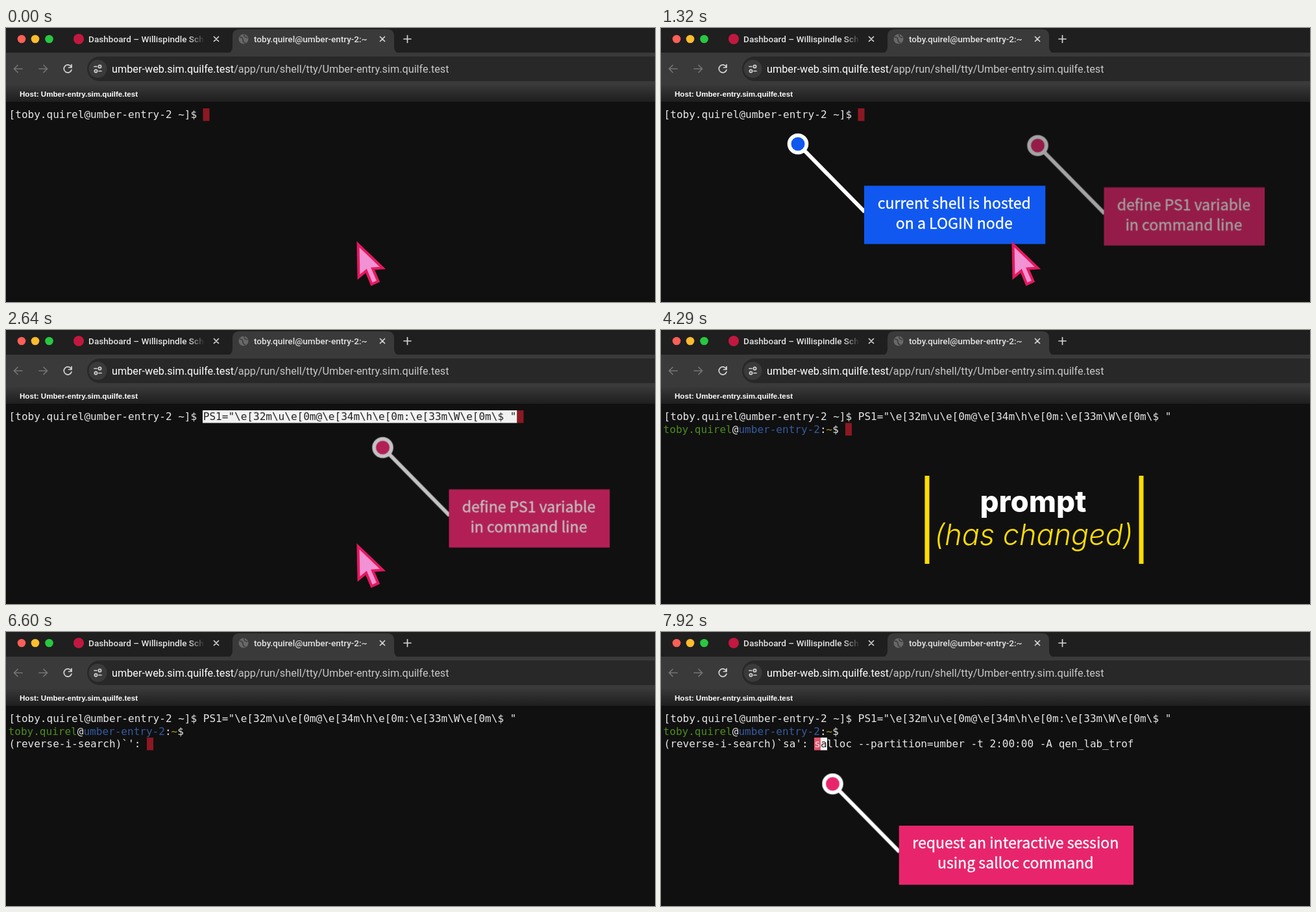
Write an HTML page that moves like this. It is 1000 px wide and 423 px high and loops after 8 s.

```html
<!DOCTYPE html>
<html lang="en">
<head>
<meta charset="utf-8">
<title>Shell session</title>
<style>
  html, body { margin: 0; width: 100%; height: 100%; overflow: hidden; background: #101010; }
  svg { display: block; width: 100vw; height: 100vh; }
  text { white-space: pre; }
  .ui { font: 500 13.6px Roboto, sans-serif; fill: #e4e4e4; }
  .url { font: 400 16.25px Roboto, sans-serif; fill: #c9c9c9; }
  .host { font: 700 11.6px "Liberation Sans", sans-serif; fill: #fff; }
  .term { font: 16.04px "DejaVu Sans Mono", monospace; fill: #e6e6e6; }
  .note { font: 400 23.1px "Noto Sans CJK JP", "Noto Sans CJK SC", "Noto Sans CJK", sans-serif;
          fill: #fff; stroke: #fff; stroke-width: .35; text-anchor: middle; }
  .head { font: 800 45.6px Inter, sans-serif; fill: #fff; text-anchor: middle; }
  .sub { font: italic 300 45px Inter, sans-serif; fill: #ffdc00; text-anchor: middle; }
  .icon { fill: none; stroke: #d6d6d6; stroke-width: 1.7; stroke-linecap: round; }
  .dim { stroke: #747474; }
  .user { fill: #4d8c1f; } .node { fill: #355ba0; } .dir { fill: #b89a10; }
</style>
</head>
<body>
<svg viewBox="0 0 1000 423" preserveAspectRatio="none">
  <defs>
    <linearGradient id="bar" x2="0" y2="1">
      <stop offset="0" stop-color="#383838"/><stop offset="1" stop-color="#1e1e1e"/>
    </linearGradient>
    <linearGradient id="fade">
      <stop offset="0" stop-color="#1f1f1f" stop-opacity="0"/><stop offset="1" stop-color="#1f1f1f"/>
    </linearGradient>
  </defs>
  <rect width="1000" height="423" fill="#101010"/>

  <!-- browser window -->
  <rect width="1000" height="40" fill="#1f1f1f"/>
  <path d="M339 39Q349 39 349 29V13Q349 2 360 2H587Q598 2 598 13V29Q598 39 608 39Z" fill="#3a3a3a"/>
  <rect y="38" width="1000" height="50" fill="#3a3a3a"/>
  <rect x="125" y="44" width="900" height="38" rx="19" fill="#282828"/>
  <rect y="88" width="1000" height="26" fill="url(#bar)"/>
  <circle cx="24" cy="17" r="6.3" fill="#fe5f57"/>
  <circle cx="45" cy="17" r="6.3" fill="#febc2e"/>
  <circle cx="66.500" cy="17" r="6.3" fill="#28c840"/>
  <circle cx="112" cy="17" r="8" fill="#c2183f"/>
  <text class="ui" x="127" y="21.500">Dashboard – Willispindle Sch</text>
  <rect x="282" y="4" width="24" height="30" fill="url(#fade)"/>
  <rect x="306" y="4" width="10" height="30" fill="#1f1f1f"/>
  <circle cx="366" cy="17" r="7.5" fill="#686868"/>
  <path d="M360 14q5 0 5 4t4 5M367 10q-1 4 5 5" fill="none" stroke="#3a3a3a" stroke-width="1.6"/>
  <text class="ui" x="382" y="21.500">toby.quirel@umber-entry-2:~</text>
  <g class="icon">
    <path d="M320.500 13.500l7 7m0-7l-7 7M576.500 13.500l7 7m0-7l-7 7M613 17h11M618.500 11.500v11"/>
    <path class="dim" d="M25 63H13m5-5.500L12.500 63l5.500 5.500M51 63h12m-5-5.500l5.500 5.500-5.500 5.500"/>
    <path d="M100.500 60a6 6 0 1 0 .5 4.500M101 56.500v4.500h-4.500"/>
  </g>
  <circle cx="141.500" cy="63" r="14" fill="#3a3a3a"/>
  <g class="icon">
    <path d="M136 59.500h4M143 66.500h4"/>
    <circle cx="144.500" cy="59.500" r="2.100"/><circle cx="138.500" cy="66.500" r="2.100"/>
  </g>
  <text class="url" x="163" y="68.500"><tspan fill="#fff">umber-web.sim.quilfe.test</tspan>/app/run/shell/tty/Umber-entry.sim.quilfe.test</text>
  <text class="host" x="21" y="106">Host: Umber-entry.sim.quilfe.test</text>

  <!-- terminal -->
  <rect id="mark" x="303" y="124" width="484.500" height="19.500" fill="#f2f2f2"/>
  <rect id="caret" width="10" height="19.500" fill="#8c1822"/>
  <g id="match">
    <rect x="236" y="163" width="10" height="19.500" fill="#e8536b"/>
    <rect x="246" y="163" width="10" height="19.500" fill="#f5f5f5"/>
  </g>
  <text class="term" x="4.600" y="139">[toby.quirel@umber-entry-2 ~]$ <tspan id="command"></tspan></text>
  <text class="term prompt" x="3.600" y="158.500"></text>
  <text class="term prompt" x="3.600" y="178"></text>
  <text class="term" id="search" x="4.600" y="178"></text>

  <g id="notes"></g>

  <g id="title">
    <g id="bars" fill="#ffdc00">
      <rect x="406.500" y="225" width="7" height="136"/>
      <rect x="736.500" y="225" width="7" height="136"/>
    </g>
    <g id="words">
      <text class="head" x="573.500" y="281">prompt</text>
      <text class="sub" x="574.500" y="331.500">(has changed)</text>
    </g>
  </g>

  <path id="pointer" d="M542.500 334L543.500 384.500L555 375L563.500 395.500L573.500 391L565 371.500L580.500 370.500Z"
        fill="#f291d3" stroke="#e5195f" stroke-width="4"/>
</svg>
<script>
const LOOP = 8000, STEP = 330, FADE = 880;
const $ = id => document.getElementById(id);
const ramp = (t, from, to) => Math.min(1, Math.max(0, (t - from) / (to - from)));
const show = (el, on) => el.setAttribute("display", on ? "inline" : "none");

const COMMAND = String.raw`PS1="\e[32m\u\e[0m@\e[34m\h\e[0m:\e[33m\W\e[0m\$ "`;
const PROMPT = '<tspan class="user">toby.quirel</tspan>@<tspan class="node">umber-entry-2</tspan>:<tspan class="dir">~</tspan>$';
const FOUND = "(reverse-i-search)`sa': s<tspan fill='#222'>a</tspan>lloc --partition=umber -t 2:00:00 -A qen_lab_trof";
const EMPTY = "(reverse-i-search)`': ";

// Moments at which the terminal changes
const PASTE = 1980, ENTER = 2970, ENTER_AGAIN = 5940, CLEAR = 6270, SEARCH = 6600, MATCH = 6930;

const notes = [
  { x: 211, y: 179, w: 279.5, h: 90, color: "#1058f0", start: 200, end: 1400,
    lines: ["current shell is hosted", "on a LOGIN node"] },
  { x: 580.5, y: 181.5, w: 248, h: 90, color: "#e8256c", start: 775, end: 2420,
    lines: ["define PS1 variable", "in command line"] },
  { x: 264.5, y: 234.5, w: 361.5, h: 91.5, color: "#e8256c", start: 6600, end: 9000,
    lines: ["request an interactive session", "using salloc command"] }
];

$("notes").innerHTML = notes.map(({ x, y, w, h, color, lines }, i) => `
  <g id="note${i}" transform="translate(${x} ${y})">
    <clipPath id="wipe${i}"><rect x="102" y="64" height="${h + 2}"/></clipPath>
    <path d="M0 0L103 105" stroke="#fff" stroke-width="6"/>
    <circle r="13.400" fill="${color}" stroke="#fff" stroke-width="5.800"/>
    <g clip-path="url(#wipe${i})">
      <rect x="102" y="64.500" width="${w}" height="${h}" fill="${color}"/>
      ${lines.map((line, n) =>
        `<text class="note" x="${101 + w / 2}" y="${99.5 + 31 * n}">${line}</text>`).join("")}
    </g>
  </g>`).join("");

const prompts = [...document.querySelectorAll(".prompt")];
prompts.forEach(p => p.innerHTML = PROMPT);
$("command").textContent = COMMAND;

function drawNotes(t) {
  notes.forEach(({ start, end, w }, i) => {
    const alpha = Math.min(ramp(t, start, start + FADE), 1 - ramp(t, end, end + FADE));
    $("note" + i).setAttribute("opacity", alpha);
    $("wipe" + i).firstChild.setAttribute("width", w * ramp(t, start, start + 310));
  });
}

function drawTerminal(t) {
  const selected = t >= PASTE && t < ENTER;
  show($("mark"), selected);
  show($("command"), t >= PASTE);
  $("command").setAttribute("fill", selected ? "#222" : "#e6e6e6");
  show(prompts[0], t >= ENTER);
  show(prompts[1], t >= ENTER_AGAIN && t < SEARCH);
  show($("search"), t >= SEARCH);
  $("search").innerHTML = t >= MATCH ? FOUND : EMPTY;
  show($("match"), t >= MATCH);

  const [x, y] = t < PASTE ? [303.5, 124]
    : t < ENTER ? [787.5, 124]
    : t < ENTER_AGAIN ? [284, 143.5]
    : t < SEARCH ? [284, 163]
    : [217, 163];
  $("caret").setAttribute("x", x);
  $("caret").setAttribute("y", y);
  show($("caret"), t < MATCH);
}

function drawTitle(t) {
  show($("title"), t >= 3000 && t < CLEAR);
  const grow = ramp(t, 3000, 3300);
  $("bars").setAttribute("transform", `translate(0 ${293 * (1 - grow)}) scale(1 ${grow})`);
  $("words").setAttribute("opacity", ramp(t, 3000, 3700));
}

function draw(now) {
  const t = Math.floor((now % LOOP) / STEP) * STEP;
  drawTerminal(t);
  drawNotes(t);
  drawTitle(t);
  show($("pointer"), t < ENTER);
}

const origin = performance.now();
function tick() {
  draw(performance.now() - origin);
  requestAnimationFrame(tick);
}
tick();
</script>
</body>
</html>
```
